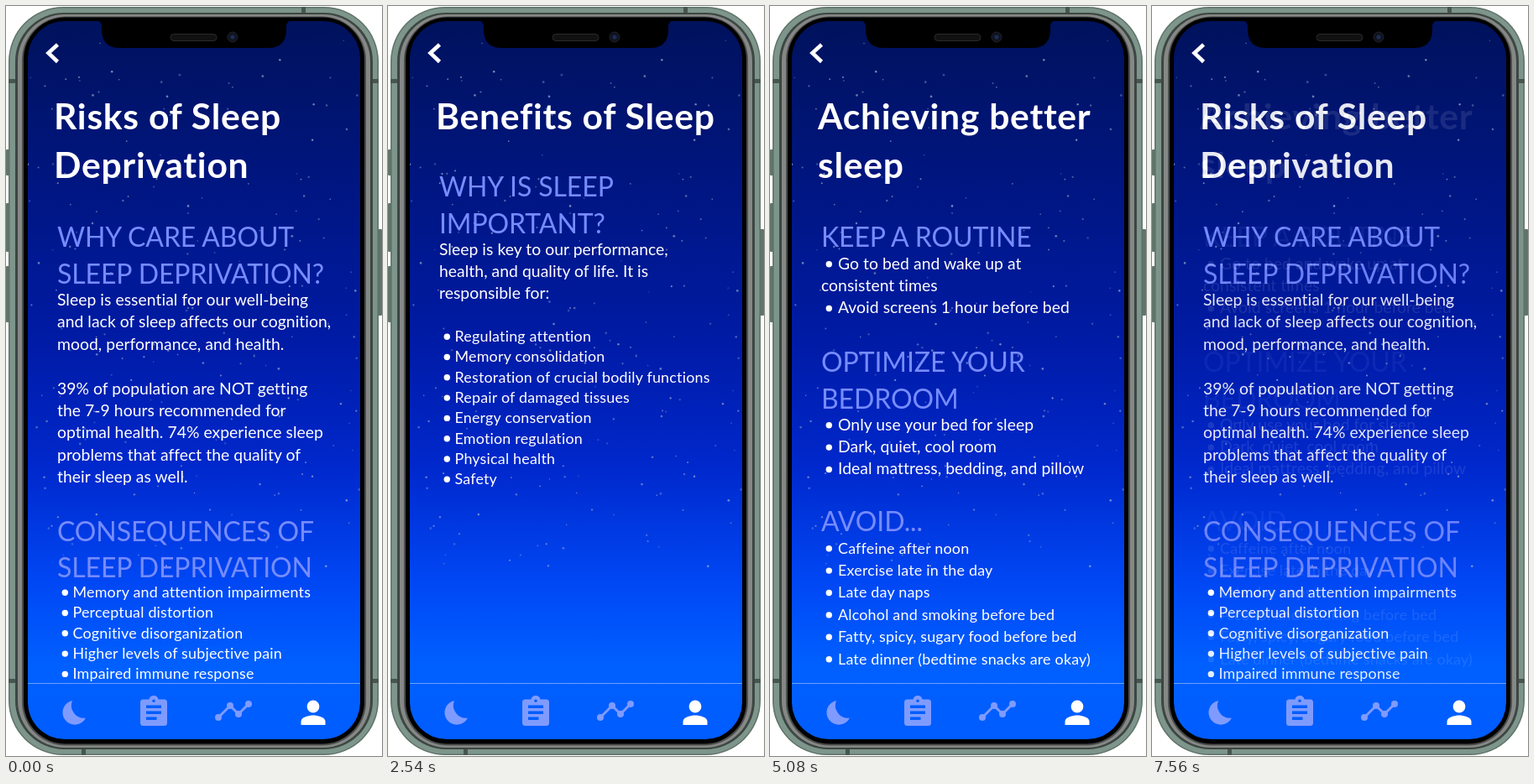
An HTML page for the animation above (7.62 s loop, 448x894 px).

```html
<!DOCTYPE html>
<html lang="en">
<head>
<meta charset="utf-8">
<title>Sleep education screens</title>
<style>
  html, body { margin: 0; width: 100%; height: 100%; overflow: hidden; background: #fff; }
  svg { display: block; width: 448px; height: 894px; }
  text { font-family: Lato, "Open Sans", sans-serif; fill: #fff; }
  .title { font-size: 42.7px; font-weight: 700; letter-spacing: .7px; }
  .heading { font-size: 32px; font-weight: 400; letter-spacing: -.1px; fill: #768cff; }
  .body { font-size: 19.35px; letter-spacing: .04px; }
  .small { font-size: 17.9px; letter-spacing: .2px; }
  #pages { isolation: isolate; }
  .page { mix-blend-mode: plus-lighter; }
</style>
</head>
<body>
<svg viewBox="0 0 448 894">
  <defs>
    <linearGradient id="sky" x2="0" y2="1">
      <stop offset="0" stop-color="#00125c"/>
      <stop offset=".2" stop-color="#00157c"/>
      <stop offset=".45" stop-color="#001ba6"/>
      <stop offset=".62" stop-color="#0028cc"/>
      <stop offset=".78" stop-color="#0047f4"/>
      <stop offset=".9" stop-color="#0060ff"/>
      <stop offset="1" stop-color="#005cff"/>
    </linearGradient>
    <clipPath id="screenClip"><rect x="26" y="18" width="396" height="856" rx="44"/></clipPath>
  </defs>

  <g id="buttons" fill="#61746b"></g>
  <rect x="3" y="1" width="441" height="892" rx="65" fill="#5d7168"/>
  <rect x="4.500" y="2.500" width="438" height="889" rx="63.500" fill="#7d958b"/>
  <g id="bands" fill="#46564f"></g>
  <rect x="11" y="8" width="426" height="878" rx="58" fill="#3d4643"/>
  <rect x="14" y="10" width="420" height="874" rx="56" fill="#858886"/>
  <rect x="19" y="12.500" width="410" height="869" rx="52" fill="#4a4c4b"/>
  <rect x="21" y="13.500" width="406" height="866" rx="50" fill="#000"/>

  <g clip-path="url(#screenClip)">
    <rect x="26" y="18" width="396" height="856" fill="url(#sky)"/>
    <g id="stars" fill="#9db3d0"></g>
    <path d="M26 807.500H422" stroke="#6fa0ff" stroke-width="1.200"/>
  </g>
  <path d="M106 17Q114 17 114 25V28Q114 50 136 50H312Q334 50 334 28V25Q334 17 342 17Z" fill="#000"/>
  <rect x="196" y="33.500" width="55" height="8" rx="4" fill="#111" stroke="#2a2a2c"/>
  <circle cx="270" cy="37" r="6" fill="#10131c" stroke="#202228"/>
  <circle cx="270" cy="37" r="2.600" fill="#1d2b57"/>

  <path d="M61.500 46L50.500 56L61.500 66.500" fill="none" stroke="#fff" stroke-width="4.600"/>
  <g id="pages"></g>

  <g fill="#7f9bff">
    <path d="M79 828A14.500 14.500 0 1 0 95 848.500A15 15 0 0 1 79 828Z"/>
    <path fill-rule="evenodd" d="M163.500 826.500H170.500A5.600 5.600 0 0 1 181.500 826.500H188.500Q192 826.500 192 830V854.500Q192 858 188.500 858H163.500Q160 858 160 854.500V830Q160 826.500 163.500 826.500Z
      M174.200 828.200A1.800 1.800 0 1 0 177.800 828.200A1.800 1.800 0 1 0 174.200 828.200Z
      M167 833.500V837H185V833.500ZM167 840.500V844H185V840.500ZM167 847.500V851H179.500V847.500Z"/>
    <g id="trend"></g>
  </g>
  <g fill="#fff">
    <circle cx="366" cy="835" r="7.400"/>
    <path d="M351.500 857V853C351.500 847.500 361 845.500 366 845.500S380.500 847.500 380.500 853V857Z"/>
  </g>
</svg>
<script>
const HOLD = 2000, STEP = 60, SPAN = 2540;
const byId = id => document.getElementById(id);

function add(parent, tag, attrs, content = "") {
  const node = document.createElementNS("http://www.w3.org/2000/svg", tag);
  for (const key in attrs) node.setAttribute(key, attrs[key]);
  node.textContent = content;
  return parent.appendChild(node);
}

const rects = (parent, list) => list.forEach(([x, y, width, height]) =>
  add(parent, "rect", { x, y, width, height, rx: 1 }));

rects(byId("buttons"), [[0, 171, 6, 31], [0, 235, 6, 58], [0, 310, 6, 67], [441, 266, 7, 103]]);
rects(byId("bands"), [[352, 1, 5, 8], [90, 885, 5, 8], [3, 87, 8, 5], [436, 87, 8, 5],
  [3, 802, 8, 5], [436, 802, 8, 5]]);

let seed = 17;
const random = () => (seed = seed * 16807 % 2147483647) / 2147483647;
for (let i = 0; i < 200; i++) {
  add(byId("stars"), "circle", {
    cx: 26 + random() * 396, cy: 40 + random() * 630,
    r: .7 + random() * .7, opacity: .3 + random() * .45
  });
}

const knots = [[253, 848], [267, 834], [277, 844], [289, 832]];
add(byId("trend"), "polyline", { points: knots.join(" "), fill: "none", stroke: "#7f9bff", "stroke-width": 3 });
knots.forEach(([cx, cy]) => add(byId("trend"), "circle", { cx, cy, r: 4 }));

const pages = [0, 1, 2].map(() => add(byId("pages"), "g", { class: "page" }));

function lines(page, style, x, y, step, list) {
  list.forEach((line, i) => add(pages[page], "text", { class: style, x, y: y + i * step }, line));
}
const title = (page, ...list) => lines(page, "title", 57, 146.5, 58, list);
const heading = (page, y, ...list) => lines(page, "heading", 61, y, 43.5, list);
const body = (page, y, ...list) => lines(page, "body", 61, y, 26.4, list);
function bullets(page, style, x, y, step, ...list) {
  lines(page, style, x, y, step, list);
  list.forEach((_, i) => add(pages[page], "circle", { cx: 70.3, cy: y + i * step - 5.8, r: 3.7, fill: "#fff" }));
}
const tightBullets = (page, y, ...list) => bullets(page, "small", 79.5, y, 24.3, ...list);
const looseBullets = (style, y, ...list) => bullets(2, style, 81, y, 26.4, ...list);

title(0, "Risks of Sleep", "Deprivation");
heading(0, 287, "WHY CARE ABOUT", "SLEEP DEPRIVATION?");
body(0, 357, "Sleep is essential for our well-being", "and lack of sleep affects our cognition,",
  "mood, performance, and health.", "", "39% of population are NOT getting",
  "the 7-9 hours recommended for", "optimal health. 74% experience sleep",
  "problems that affect the quality of", "their sleep as well.");
heading(0, 637.5, "CONSEQUENCES OF", "SLEEP DEPRIVATION");
tightBullets(0, 705, "Memory and attention impairments", "Perceptual distortion",
  "Cognitive disorganization", "Higher levels of subjective pain", "Impaired immune response");

title(1, "Benefits of Sleep");
heading(1, 227, "WHY IS SLEEP", "IMPORTANT?");
body(1, 296.5, "Sleep is key to our performance,", "health, and quality of life. It is", "responsible for:");
tightBullets(1, 400, "Regulating attention", "Memory consolidation",
  "Restoration of crucial bodily functions", "Repair of damaged tissues",
  "Energy conservation", "Emotion regulation", "Physical health", "Safety");

title(2, "Achieving better", "sleep");
heading(2, 287, "KEEP A ROUTINE");
looseBullets("body", 313.5, "Go to bed and wake up at");
body(2, 339.9, "consistent times");
looseBullets("body", 366.3, "Avoid screens 1 hour before bed");
heading(2, 436, "OPTIMIZE YOUR", "BEDROOM");
looseBullets("body", 505.5, "Only use your bed for sleep", "Dark, quiet, cool room",
  "Ideal mattress, bedding, and pillow");
heading(2, 626, "AVOID...");
looseBullets("small", 652.5, "Caffeine after noon", "Exercise late in the day", "Late day naps",
  "Alcohol and smoking before bed", "Fatty, spicy, sugary food before bed",
  "Late dinner (bedtime snacks are okay)");

// Each page holds, then dissolves into the next one in tenths.
function draw(time) {
  const current = Math.floor(time / SPAN) % 3, local = time % SPAN;
  const mix = local < HOLD ? 0 : (Math.floor((local - HOLD) / STEP) + 1) / 10;
  const opacity = [0, 0, 0];
  opacity[current] = 1 - mix;
  opacity[(current + 1) % 3] = mix;
  pages.forEach((page, i) => { page.style.opacity = opacity[i]; });
}

const start = performance.now();
function tick() {
  draw(performance.now() - start);
  requestAnimationFrame(tick);
}
tick();
</script>
</body>
</html>
```
